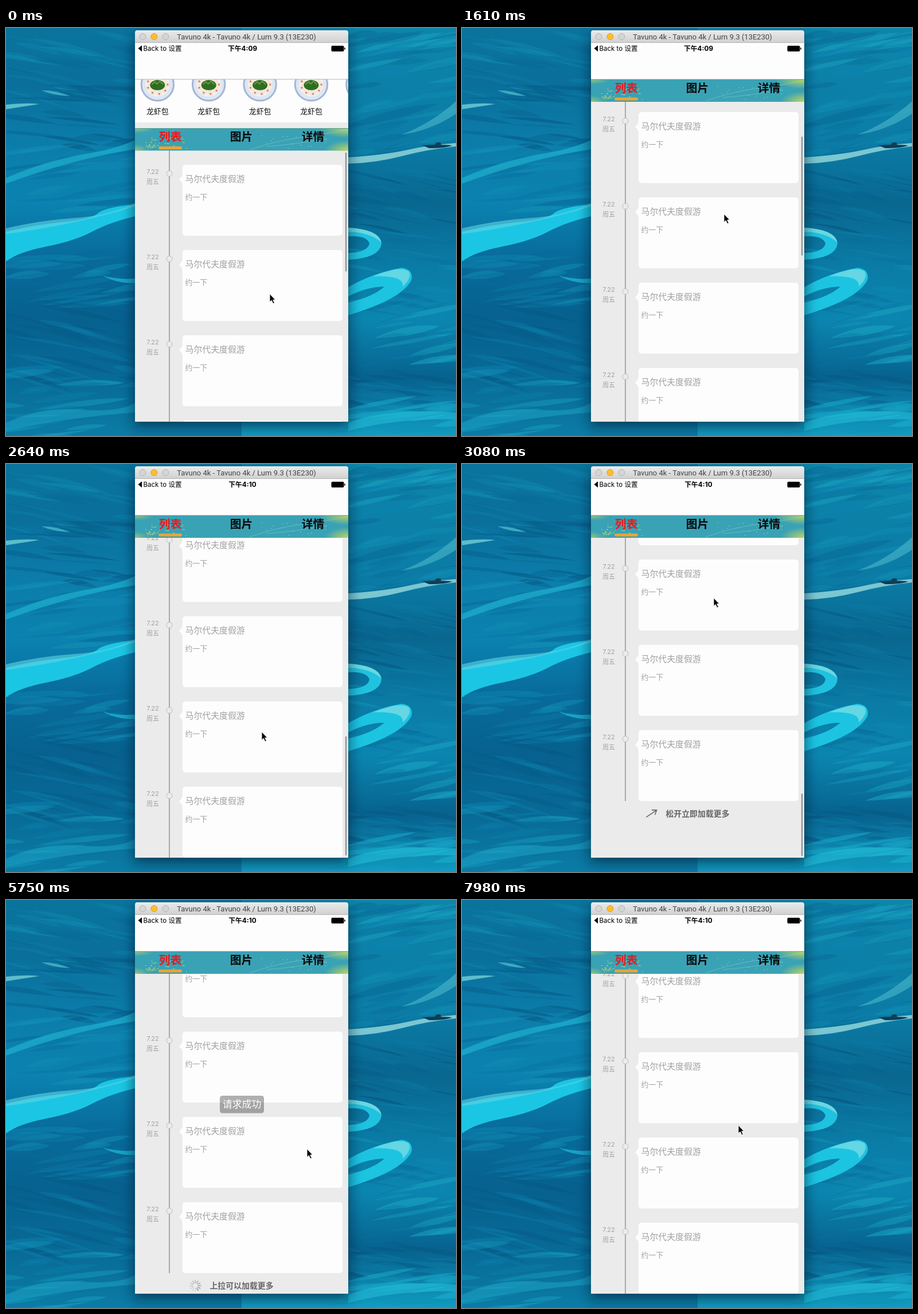
An HTML page with a canvas for the animation above (8000 ms loop, 785x713 px).

```html
<!DOCTYPE html>
<html lang="zh">
<head>
<meta charset="utf-8">
<title>Timeline list</title>
<style>
html, body { margin: 0; width: 100%; height: 100%; overflow: hidden; background: #0a78a4; }
canvas, svg { position: absolute; left: 0; top: 0; display: block; }
text { font-family: Inter, "Noto Sans CJK SC", "Noto Sans CJK", sans-serif; }
.mid { text-anchor: middle; }
.bold { font-weight: 700; }
.tab { font-size: 19.8px; font-weight: 700; text-anchor: middle; }
.date { font-size: 11px; fill: #a2a2a2; text-anchor: middle; }
.title { font-size: 14.9px; fill: #a0a0a0; }
.sub { font-size: 12.9px; fill: #a0a0a0; }
.foot { font-size: 13.9px; font-weight: 700; fill: #666; text-anchor: middle; }
</style>
</head>
<body>
<canvas id="sea" width="785" height="713"></canvas>
<svg width="785" height="713" viewBox="0 0 785 713">
  <defs>
    <linearGradient id="bar" x2="0" y2="1"><stop stop-color="#ebebeb"/><stop offset="1" stop-color="#d0d0d0"/></linearGradient>
    <radialGradient id="lime"><stop stop-color="#c3d75c"/><stop offset="1" stop-color="#c3d75c" stop-opacity="0"/></radialGradient>
    <filter id="soft" x="-20%" y="-20%" width="140%" height="140%"><feGaussianBlur stdDeviation="11"/></filter>
    <clipPath id="screen"><rect x="225" y="26" width="372" height="662"/></clipPath>
    <clipPath id="tabsBox"><rect x="225" width="372" height="39.5"/></clipPath>
    <g id="card">
      <circle cx="285" cy="15.5" r="5" fill="#ebebeb" stroke="#b9b9b9"/>
      <text class="date" x="256" y="16">7.22</text>
      <text class="date" x="256" y="34">周五</text>
      <rect x="308" width="279" height="124" rx="5" fill="#fdfdfd"/>
      <path d="M308.5 16Q307 21 302 26Q307 30 308.5 36z" fill="#fdfdfd"/>
      <text class="title" x="312.5" y="30">马尔代夫度假游</text>
      <text class="sub" x="312.5" y="60.5">约一下</text>
    </g>
    <g id="dish">
      <circle r="28.2" fill="#dde6f3" stroke="#a3b6d3" stroke-width="3"/>
      <circle r="21" fill="#eef2f8"/>
      <g id="buns"></g>
      <ellipse cy="1" rx="13" ry="9" fill="#2f6d22"/>
      <path d="M-10 0l5-5 4 4 5-5 6 6" fill="none" stroke="#6d9a3d" stroke-width="2"/>
      <text class="mid" y="51" font-size="12.9" fill="#111">龙虾包</text>
    </g>
  </defs>

  <rect x="223" y="14" width="376" height="682" fill="#001825" opacity=".6" filter="url(#soft)"/>
  <path d="M225 26V8q0-4 4-4h364q4 0 4 4v18z" fill="url(#bar)"/>
  <path d="M225 25.5h372" stroke="#b4b4b4"/>
  <g fill="#d5d5d5" stroke="#b3b3b3">
    <circle cx="238.5" cy="15" r="5.5"/>
    <circle cx="258.3" cy="15" r="5.5" fill="#fdbd2f" stroke="#dfa023"/>
    <circle cx="278.3" cy="15" r="5.5"/>
  </g>
  <text class="mid" x="419.5" y="20" style="font:13px Roboto, sans-serif" fill="#444">Tavuno 4k - Tavuno 4k / Lum 9.3 (13E230)</text>

  <g clip-path="url(#screen)">
    <rect x="225" y="26" width="372" height="662" fill="#ebebeb"/>
    <g id="list">
      <path d="M285 190V1704" stroke="#a3a3a3" stroke-width="1.8"/>
      <g id="cards"></g>
      <g transform="translate(0 1704)">
        <text id="foot" class="foot" x="411" y="27"></text>
        <path id="arrow" d="M0 11V-11M-5-4L0-11L5-4" fill="none" stroke="#666" stroke-width="1.6"/>
        <g id="spin" stroke="#777" stroke-width="2" stroke-linecap="round"></g>
      </g>
    </g>
    <g id="row">
      <rect x="225" y="80" width="372" height="85" fill="#fdfdfd"/>
      <g id="dishes"></g>
    </g>
    <g id="tabs">
      <g clip-path="url(#tabsBox)">
        <rect x="225" width="372" height="39.5" fill="#3aa2b5"/>
        <ellipse cx="597" cy="0" rx="52" ry="17" fill="url(#lime)"/>
        <ellipse cx="597" cy="40" rx="42" ry="19" fill="url(#lime)"/>
        <ellipse cx="225" cy="0" rx="34" ry="9" fill="url(#lime)" opacity=".7"/>
        <ellipse cx="225" cy="40" rx="24" ry="12" fill="url(#lime)" opacity=".7"/>
        <path d="M425 38Q470 22 515 16T595 3M455 32Q500 29 560 18" fill="none" stroke="#8fcbd0" stroke-width=".8" opacity=".7"/>
        <g id="sparks"></g>
        <path d="M225 .5h372" stroke="#4f9c96"/>
      </g>
      <text class="tab" x="286.5" y="22" fill="#e9181c">列表</text>
      <text class="tab" x="410.5" y="22" fill="#0a0a0a">图片</text>
      <text class="tab" x="535.5" y="22" fill="#0a0a0a">详情</text>
      <rect x="266" y="32" width="41" height="5" rx="2.5" fill="#efa32e"/>
    </g>
    <rect id="thumb" x="591.8" width="2.6" rx="1.3" fill="#989898"/>
    <rect x="225" y="26" width="372" height="63.5" fill="#fdfdfd"/>
    <path d="M225 89.5h372" stroke="#bcbcbc"/>
    <path d="M230.5 35.7l6.5-5.5v11z"/>
    <text x="239.5" y="40" font-size="11.5">Back to 设置</text>
    <text id="clock" class="mid bold" x="412.5" y="40.3" font-size="11.8"></text>
    <rect x="567.5" y="31" width="22" height="10" rx="2"/>
    <path d="M590.3 34q1.7 0 1.7 2t-1.7 2z"/>
    <g id="toast">
      <rect x="373" y="342" width="77" height="30.5" rx="4.5" fill="#000" opacity=".31"/>
      <text class="mid" x="411.5" y="363.2" font-size="16.9" fill="#fff">请求成功</text>
    </g>
  </g>
  <path id="cursor" d="M0 0V14.5L3.3 11.5L6 17.2L8.4 16.1L5.8 10.6H10z" stroke="#fff" stroke-width="1"/>
</svg>
<script>
const $ = id => document.getElementById(id);
let seed = 11;
const rnd = (a = 0, b = 1) => {
  seed = (seed * 16807) % 2147483647;
  return a + (b - a) * seed / 2147483647;
};
const repeat = (n, fn) => Array.from({ length: n }, (_, i) => fn(i)).join('');

// Painted sea
const ctx = $('sea').getContext('2d');
const fill = (path, color, alpha = 1) => {
  ctx.globalAlpha = alpha;
  ctx.fillStyle = color;
  ctx.fill(new Path2D(path));
};
const lens = (x, y, w, h, slope, color, alpha) => {
  const mx = x + w / 2, my = y + w * slope / 2;
  fill(`M${x} ${y}Q${mx} ${my - h} ${x + w} ${y + w * slope}Q${mx + w / 8} ${my + h * .5} ${x} ${y}`, color, alpha);
};
const base = (x, w, colors) => {
  const g = ctx.createLinearGradient(0, 0, 0, 713);
  colors.forEach((c, i) => g.addColorStop(i / (colors.length - 1), c));
  ctx.globalAlpha = 1;
  ctx.fillStyle = g;
  ctx.fillRect(x, 0, w, 713);
};
const band = (x0, x1, y0, y1, slope, n, colors) => {
  for (let i = 0; i < n; i++) {
    lens(rnd(x0 - 60, x1 - 30), rnd(y0, y1), rnd(50, 170), rnd(4, 18), slope + rnd(-.08, .08),
      colors[i % colors.length], rnd(.25, .6));
  }
};
const deep = ['#06608c', '#0b7ba6', '#075680'];
const mid = ['#0c82ac', '#086b99', '#1290b5'];
const pale = ['#1aa3c2', '#0c84b0', '#0a709c'];

function paintSea() {
  base(0, 411, ['#0a749c', '#0a6f9b', '#0c7dab', '#0b82b0', '#086a9a', '#07618f', '#086a96', '#0b7ca6']);
  band(0, 225, 0, 110, .22, 34, mid);
  band(0, 225, 100, 210, .12, 26, deep);
  band(0, 225, 200, 330, -.14, 30, mid);
  band(0, 225, 390, 500, -.12, 26, mid);
  band(0, 225, 470, 610, .24, 34, deep);
  band(0, 225, 600, 720, -.08, 28, pale);
  base(411, 374, ['#0d86aa', '#0c80a8', '#0b7ba5', '#09678f', '#0a7aa4', '#0b86b0', '#07628e', '#129cc2']);
  band(597, 785, 0, 110, -.18, 30, pale);
  band(597, 785, 100, 230, -.2, 26, mid);
  band(597, 785, 240, 350, .2, 26, deep);
  band(597, 785, 350, 490, .12, 24, mid);
  band(597, 785, 480, 610, -.2, 30, pale);
  band(597, 785, 600, 660, .12, 20, deep);
  band(597, 785, 665, 720, -.14, 18, ['#1cb4d2', '#0f93b8']);

  // left waves
  fill('M0 134Q40 130 58 133Q25 138 0 142z', '#6dcbd4', .85);
  fill('M62 109Q85 108 112 119Q82 118 62 109z', '#49b8cc', .8);
  fill('M0 262Q70 232 130 222T225 196V212Q120 228 0 272z', '#1fb1cf', .7);
  fill('M0 356Q50 344 100 339T160 324T225 308V329Q180 340 150 356T70 382T0 408z', '#1bc6e4');
  fill('M0 350Q60 336 120 332T225 306V312Q120 344 0 360z', '#5fd5e4', .6);
  fill('M168 432Q190 440 225 438V446Q190 446 168 432z', '#1bb2d4', .8);
  fill('M0 690Q60 662 130 667T225 655V672Q110 680 0 704z', '#1b9fc2', .6);

  // right waves
  fill('M597 226Q660 222 700 213T785 201V207Q735 212 690 224T597 237z', '#8fd5da', .85);
  fill('M690 186Q740 168 785 128V150Q740 180 690 186z', '#46b4c8', .65);
  fill('M597 349Q653 352 655 377Q652 402 597 405V393Q632 392 634 376Q628 362 597 364z', '#1fc2df');
  fill('M597 349Q650 352 655 375Q636 357 597 356z', '#7edbe2', .8);
  fill('M597 453Q640 428 690 419Q712 422 707 441Q690 474 597 502V480Q640 470 660 452Q630 452 597 469z', '#1cc4e2');
  fill('M640 434Q690 414 703 426Q708 437 692 452Q696 432 640 434z', '#7cdce4', .75);
  fill('M597 690Q660 664 785 672V684Q680 682 597 704z', '#22bcd8', .6);

  // boat
  fill('M726 205Q750 203 778 205Q770 210 738 210zM748 204l3-4h7l1 4z', '#103c55');
}
paintSea();

// Repeated parts
const use = (id, x, y) => `<use href="#${id}" x="${x}" y="${y}"/>`;
$('buns').innerHTML = repeat(9, i => {
  const a = i * Math.PI / 4.5, x = 16 * Math.cos(a), y = 15 * Math.sin(a);
  return `<circle cx="${x}" cy="${y}" r="5.2" fill="#f4e6d6"/><circle cx="${x * 1.1}" cy="${y * 1.1}" r="1.6" fill="#d77a5c"/>`;
});
$('cards').innerHTML = repeat(10, i => use('card', 0, 239 + 149 * i));
$('dishes').innerHTML = repeat(5, i => use('dish', 264.3 + 89.4 * i, 98.8));
$('sparks').innerHTML = repeat(46, i => {
  const x = i < 26 ? rnd(243, 264) : rnd(240, 315), y = i < 16 ? rnd(29, 34) : rnd(14, 36);
  return `<rect x="${x}" y="${y}" width="${rnd(1, 4)}" height="1.2" fill="#d3da5e" opacity="${rnd(.5, 1)}"/>`;
}) + repeat(16, () => `<rect x="${rnd(430, 560)}" y="${rnd(10, 36)}" width="1.3" height="1" fill="#a5d7d8"/>`);
$('spin').innerHTML = repeat(12, i => `<path d="M0-5V-9.2" transform="rotate(${i * 30})"/>`);

// Tracks: [step, value...]
const scroll = [[2, 0], [3, 8], [5, 45], [8, 125], [11, 241], [12, 420], [13, 700], [14, 930], [15, 1013], [16, 1016],
  [18, 1016], [19, 1034], [20, 1078], [21, 1115], [23, 1119], [24, 1090], [25, 1062], [26, 1060],
  [38, 1060], [39, 1052], [40, 1028], [41, 1016]];
const pointer = [[0, 460, 464.5], [1, 460, 497], [2, 460, 497], [3, 460, 490], [8, 459, 410], [11, 457, 325],
  [12, 455, 270], [13, 452, 300], [14, 449, 400], [15, 446, 461.5], [18, 446, 468], [19, 445, 440], [20, 442, 330],
  [21, 439, 234], [22, 439, 229], [26, 439, 226], [28, 439, 227], [34, 505, 400], [37, 525, 435], [45, 525, 435],
  [47, 537, 442], [50, 505, 436], [52, 471, 427], [53, 476, 410], [54, 482, 393.5]];
const thumbFade = [[0, 1], [1, 0], [2, 0], [3, 1], [25, 1], [26, .75], [28, 0]];
const toastFade = [[38, 0], [39, 1], [46, 1], [49, 0]];
const turn = [[20, 0], [21, 56], [22, 180]];

const at = (keys, k, n = 1) => {
  const i = keys.findIndex(p => p[0] >= k);
  if (i < 0) return keys[keys.length - 1][n];
  if (i === 0) return keys[0][n];
  const a = keys[i - 1], b = keys[i];
  return a[n] + (b[n] - a[n]) * (k - a[0]) / (b[0] - a[0]);
};
const set = (id, attrs) => {
  for (const name in attrs) $(id).setAttribute(name, attrs[name]);
};
const move = (id, x, y, more = '') => set(id, { transform: `translate(${x} ${y})${more}` });

const stepStart = k => 146 * k + .033 * k * k - 3;
const stepAt = t => {
  let k = 0;
  while (k < 54 && stepStart(k + 1) <= t) k++;
  return k;
};

function draw(k) {
  const s = at(scroll, k), top = Math.max(89.5, 175 - s);
  move('list', 0, -s);
  move('row', 0, -s);
  move('tabs', 0, top);
  move('cursor', at(pointer, k), at(pointer, k, 2));

  const over = Math.max(0, s - (k < 24 ? 1016 : 1053)), len = 208 - over;
  const y = over ? 685 - len : top + 42.5 + Math.min(1, Math.max(0, s - 85) / 931) * 344;
  set('thumb', { y, height: len, opacity: at(thumbFade, k) });

  const loading = k >= 24 && k < 39;
  $('foot').textContent = loading ? '正在加载更多的数据...'
    : k < 24 && s > 1060 ? '松开立即加载更多' : '上拉可以加载更多';
  set('arrow', { opacity: k < 24 ? 1 : 0 });
  move('arrow', 330.5, 22, ` rotate(${at(turn, k)})`);
  set('spin', { opacity: loading ? 1 : k === 39 ? .7 : 0 });
  move('spin', loading ? 317 : 330.5, 22);
  [...$('spin').children].forEach((p, i) => p.setAttribute('opacity', .2 + .65 * ((i - k * 2 + 120) % 12) / 11));

  $('clock').textContent = k < 13 ? '下午4:09' : '下午4:10';
  set('toast', { opacity: at(toastFade, k) });
}

let last = -1;
function tick() {
  const k = stepAt(performance.now() % 8000);
  if (k !== last) draw(last = k);
  requestAnimationFrame(tick);
}
tick();
</script>
</body>
</html>
```
